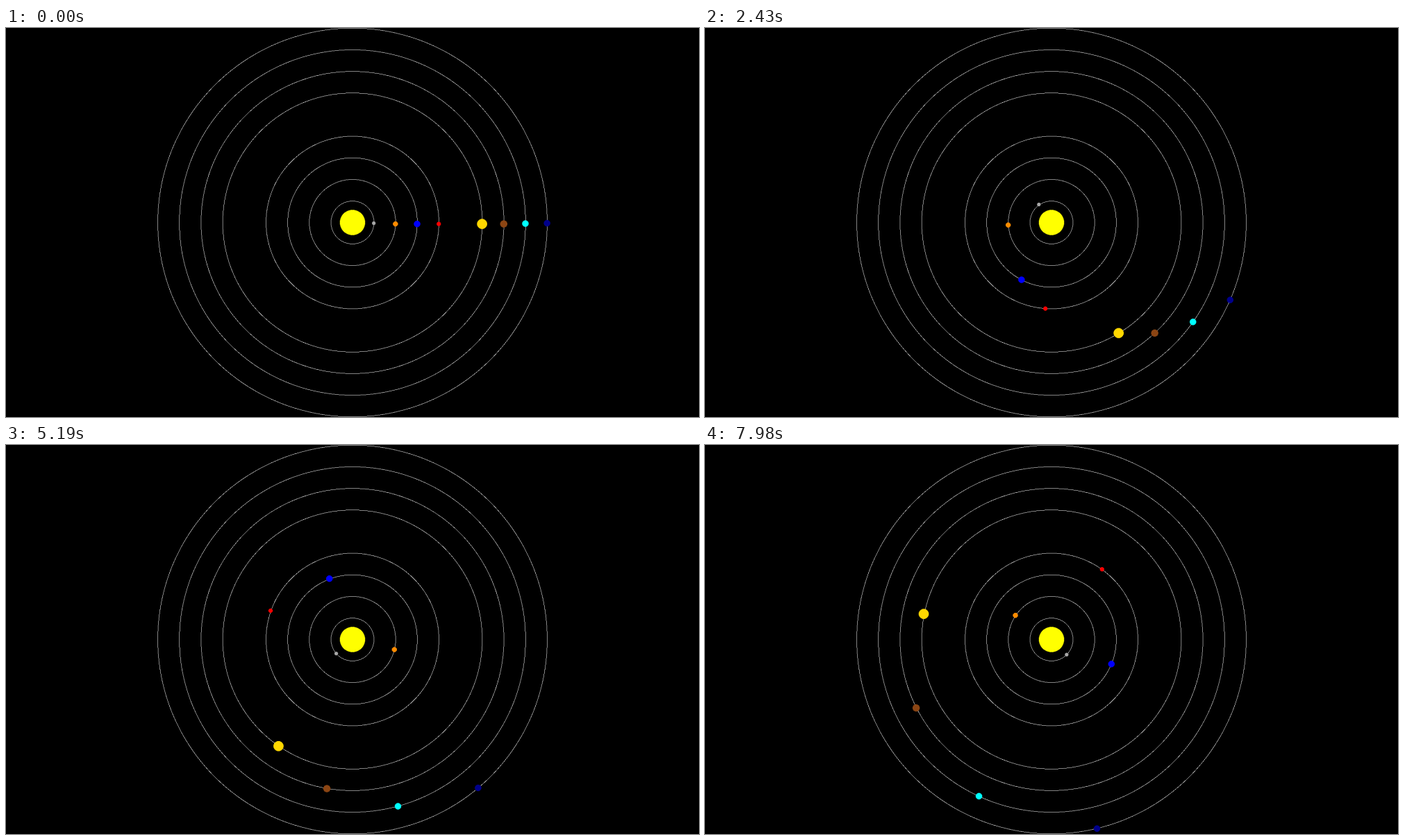
Recreate the animation shown at these times as a matplotlib script. Size 998 by 561 pixels, loop 8 s.

```python
import numpy as np
import matplotlib.pyplot as plt
from matplotlib.animation import FuncAnimation
from matplotlib.colors import to_rgb

W, H, DPI = 998, 561, 128
LOOP, STEPS = 8000, 267

# The scene is drawn on a 1920 x 1080 grid and averaged down to the stage.
SW, SH = 1920, 1080
CX, CY = SW // 2, SH // 2
GAP = 60
BELT = 5
PACE = 0.0025
SUN = 35

# colour, radius, speed in units of PACE, from the innermost outwards
PLANETS = [
    ("darkgray", 5, 20),
    ("darkorange", 7, 15),
    ("blue", 9, 10),
    ("red", 6, 8),
    ("gold", 14, 5),
    ("saddlebrown", 10, 4),
    ("cyan", 9, 3),
    ("darkblue", 9, 2),
]
ORBITS = [GAP * k for k in range(1, len(PLANETS) + 2) if k != BELT]


def shrink_matrix(count, size):
    """Share of each grid cell in each stage pixel along one axis."""
    edge = np.arange(count + 1)[:, None] * size / count
    cell = np.arange(size)[None, :]
    overlap = np.minimum(edge[1:], cell + 1) - np.maximum(edge[:-1], cell)
    return (np.clip(overlap, 0, None) * count / size).astype(np.float32)


rows, cols = shrink_matrix(H, SH), shrink_matrix(W, SW)


def distance(xs, ys, x, y):
    return np.hypot(xs[None, :] + 0.5 - x, ys[:, None] + 0.5 - y)


def shrink(a, b, grid):
    return np.stack([a @ grid[..., c] @ b.T for c in range(3)], axis=-1)


def make_sky():
    grid = np.zeros((SH, SW, 3), np.float32)
    dist = distance(np.arange(SW), np.arange(SH), CX, CY)
    for r in ORBITS:
        grid[(dist > r - 1) & (dist <= r)] = 1
    grid[dist <= SUN] = to_rgb("yellow")
    return grid


sky = make_sky()
small_sky = shrink(rows, cols, sky)


def span(mid, reach, count, size):
    """Stage pixels around a grid position, and the grid cells they cover."""
    lo = max(0, int((mid - reach) * count / size) - 1)
    hi = min(count, int((mid + reach) * count / size) + 2)
    return slice(lo, hi), slice(lo * size // count, -(-hi * size // count))


def draw_planet(img, x, y, r, color):
    px, gx = span(x, r, W, SW)
    py, gy = span(y, r, H, SH)
    patch = sky[gy, gx].copy()
    near = distance(np.arange(gx.start, gx.stop),
                    np.arange(gy.start, gy.stop), x, y)
    patch[near <= r] = to_rgb(color)
    img[py, px] = shrink(rows[py, gy], cols[px, gx], patch)


def render(step):
    img = small_sky.copy()
    for orbit, (color, r, speed) in zip(ORBITS, PLANETS):
        angle = (step + 1) * speed * PACE
        x = int(CX + orbit * np.cos(angle))
        y = int(CY + orbit * np.sin(angle))
        draw_planet(img, x, y, r, color)
    return np.rint(np.clip(img, 0, 1) * 255).astype(np.uint8)


fig = plt.figure(figsize=(W / DPI, H / DPI), dpi=DPI, facecolor="black")
ax = fig.add_axes([0, 0, 1, 1])
ax.axis("off")
view = ax.imshow(render(0), interpolation="nearest", aspect="auto")


def update(step):
    view.set_data(render(step))
    return (view,)


anim = FuncAnimation(fig, update, frames=STEPS, interval=LOOP / STEPS,
                     repeat=True, repeat_delay=0, blit=False)
plt.show()
```
